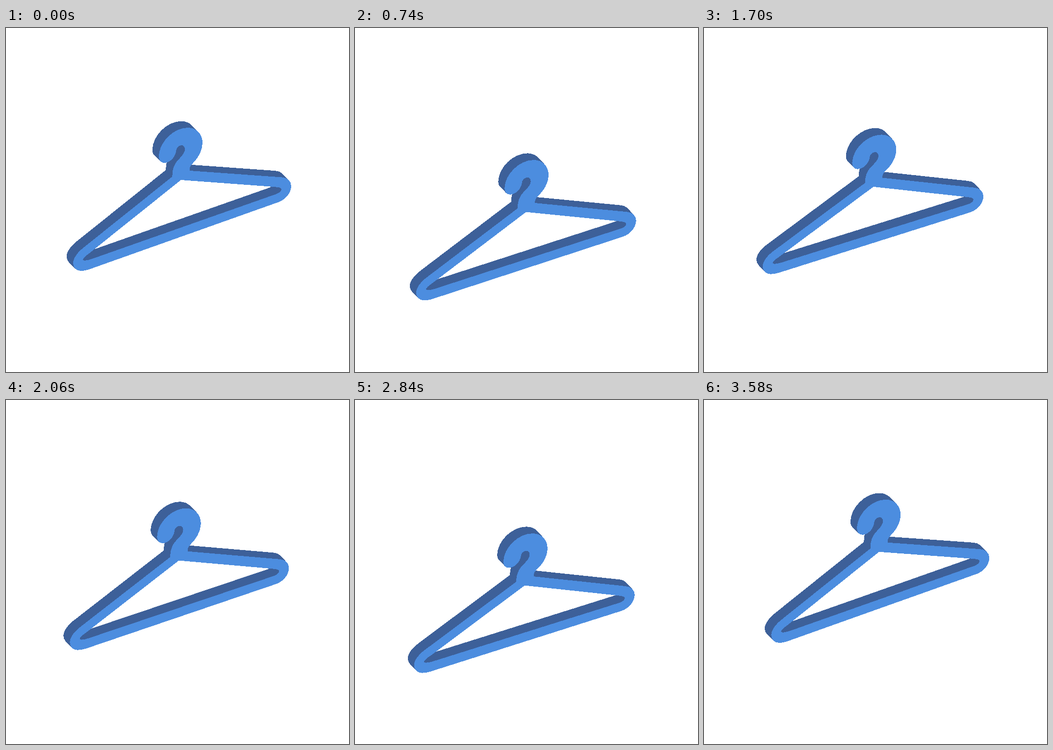
An HTML page that plays this animation: 700 by 704 pixels, repeating every 3.6 s.

```html
<!DOCTYPE html>
<html lang="en">
<head>
<meta charset="utf-8">
<title>Floating hanger</title>
<style>
  html, body { margin: 0; width: 100%; height: 100%; overflow: hidden; background: #fff; }
  svg { display: block; width: 700px; height: 704px; shape-rendering: crispEdges; }
</style>
</head>
<body>
<svg viewBox="0 0 700 704">
  <defs>
    <path id="hanger" fill-rule="evenodd" d="
      M339.5 304 C339 284 347 274 355 266 C362 258 365 254 365 248
      C365 242 361 240 358 240 C351 241 347 246 347 253
      C345 265 334 276 323 276 C316 276 312 271 312 263
      C312 234 342 204 371 204 C389 204 401 217 401 235
      C401 252 391 267 382 276 C376 282 374 286 375 292
      L563 305.5 C574 306 582 313 582 323 C582 338 570 351 557 356
      L178 491 C168 495 160 497 153 497 C143 497 137 490 137 481
      C137 470 148 457 160 448 Z
      M357 311 L170 461 C163 466 157 471 157 474 C157 477 165 476 174 473
      L551 340 C557 338 562 334 562 330 C562 326 556 326 546 325 Z"/>
  </defs>
  <g id="body">
    <g id="side" fill="#3d6099"></g>
    <use href="#hanger" fill="#4c8ddf"/>
  </g>
</svg>
<script>
  const LOOP = 3600, DEPTH = 13.3, LAYERS = 27;
  const BOB = 30.4, TILT = 1.06;
  const rad = deg => deg * Math.PI / 180;
  const body = document.getElementById('body');
  const side = document.getElementById('side');

  // Extrusion: copies of the outline swept up and to the left
  for (let i = LAYERS; i > 0; i--) {
    const layer = document.createElementNS('http://www.w3.org/2000/svg', 'use');
    const d = -DEPTH * i / LAYERS;
    layer.setAttribute('href', '#hanger');
    layer.setAttribute('x', d);
    layer.setAttribute('y', d);
    side.append(layer);
  }

  // Two bobs and three tilts about the stage corner per loop
  const bob = p => -BOB * Math.cos(rad(720 * p + 2));
  const tilt = p => -TILT * Math.cos(rad(1080 * p + 22));

  function draw(now) {
    const p = (now % LOOP) / LOOP;
    const y = bob(p) - bob(0), angle = tilt(p) - tilt(0);
    body.setAttribute('transform', `translate(0 ${y}) rotate(${angle})`);
    requestAnimationFrame(draw);
  }
  draw(performance.now());
</script>
</body>
</html>
```
